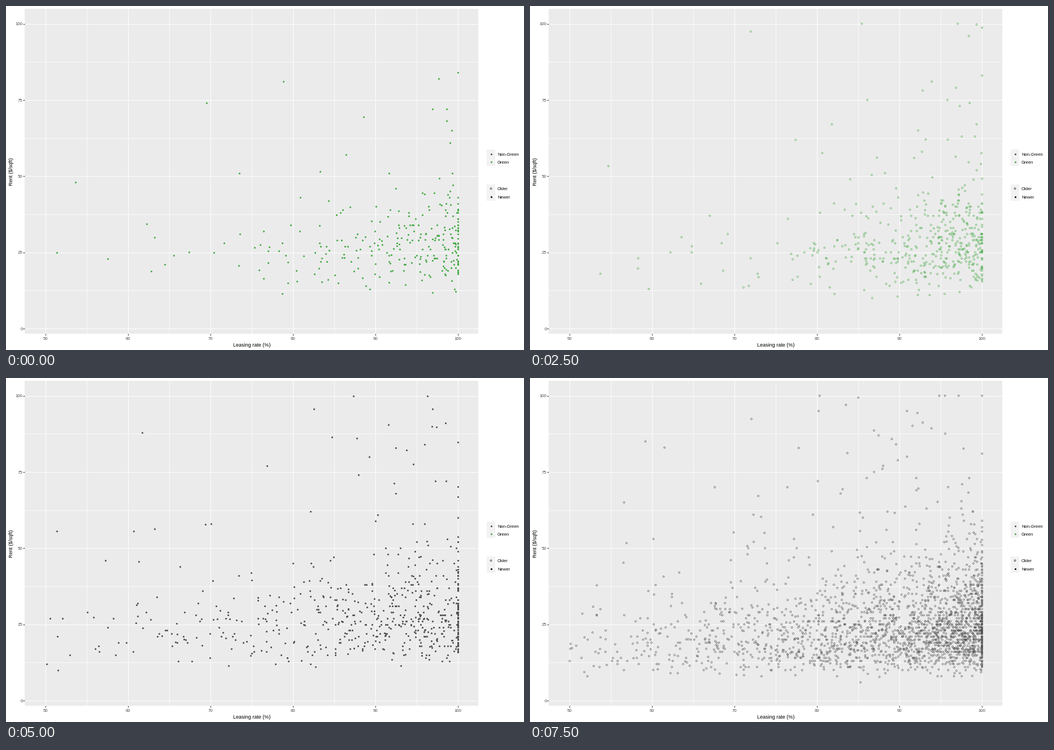
A matplotlib script for the animation above (10 s loop, 917x611 px).

```python
import matplotlib.pyplot as plt
import numpy as np
from matplotlib.animation import FuncAnimation
from matplotlib.patches import Rectangle

WIDTH, HEIGHT, DPI = 917, 611, 100
PT = 72 / DPI  # points per pixel
LEFT, RIGHT, TOP, BOTTOM = 32.5, 835.5, 4, 581
GREEN, GREY, LABEL = "#43a843", "#4d4d4d", "#4d4d4d"

plt.rcParams["font.family"] = "Liberation Sans"
rng = np.random.default_rng(11)


def rate_x(rate):
    return 69.5 + 14.605 * (rate - 50)


def rent_y(rent):
    return 572.5 - 5.415 * rent


def buildings(count, leased, spread, median, sigma, tail, landmarks):
    """Rates thin out exponentially below 100 %, rents are log-normal with a long tail."""
    total = count + leased
    vacancy = -spread * np.log(1 - rng.random(total) * (1 - np.exp(-50 / spread)))
    vacancy[count:] = 0
    rent = median * (1 - 0.006 * vacancy) * np.exp(sigma * rng.standard_normal(total))
    rent += (rng.random(total) < tail) * rng.exponential(22, total)
    rent = np.where(rng.random(total) < 0.5, np.round(rent), rent)
    cloud = np.column_stack([100 - vacancy, np.clip(rent, 3, 100)])
    return np.vstack([cloud, landmarks])


fig = plt.figure(figsize=(WIDTH / DPI, HEIGHT / DPI), dpi=DPI, facecolor="white")
ax = fig.add_axes([0, 0, 1, 1])
ax.set(xlim=(-0.5, WIDTH - 0.5), ylim=(HEIGHT - 0.5, -0.5))
ax.axis("off")


def box(x, y, w, h, color):
    ax.add_patch(Rectangle((x, y), w, h, fc=color, lw=0, zorder=0))


def line(xs, ys, color, width=1.0):
    ax.plot(xs, ys, color=color, lw=width * PT, solid_capstyle="butt", zorder=1)


def text(x, y, label, size, color="black", **kwargs):
    ax.text(x, y, label, fontsize=size * PT, color=color, va="baseline", **kwargs)


def dots(x, y, color, filled):
    size, edge = (2.7, 0.4) if filled else (2.9, 0.6)
    return ax.scatter(x, y, s=(size * PT) ** 2, facecolors=color if filled else "none",
                      edgecolors=color, linewidths=edge * PT, zorder=3)


box(LEFT, TOP, RIGHT - LEFT, BOTTOM - TOP, "#ebebeb")
for rate in range(50, 101, 5):
    x, major = rate_x(rate), rate % 10 == 0
    line([x, x], [TOP, BOTTOM], "white", 0.95 if major else 0.7)
    if major:
        line([x, x], [BOTTOM, BOTTOM + 3], "#333333")
        text(x, 592.5, str(rate), 7.8, LABEL, ha="center")
for rent in np.arange(0, 101, 12.5):
    y, major = rent_y(rent), rent % 25 == 0
    line([LEFT, RIGHT], [y, y], "white", 0.95 if major else 0.7)
    if major:
        line([LEFT - 3, LEFT], [y, y], "#333333")
        text(29, y + 2.8, f"{rent:.0f}", 7.8, LABEL, ha="right")
text(434.5, 604.7, "Leasing rate (%)", 9, ha="center")
text(11.7, 293.5, "Rent ($/sqft)", 9, ha="center", rotation=90, rotation_mode="anchor")

legend = [("Non-Green", GREY, True), ("Green", GREEN, True),
          ("Older", "black", False), ("Newer", "black", True)]
for row, (label, color, filled) in enumerate(legend):
    y = 262 + 14.5 * (row % 2) + 61.8 * (row // 2)
    box(850.7, y - 7.3, 14.5, 14.5, "#f2f2f2")
    dots([858], [y], color, filled)
    text(869.5, y + 3, label, 7.6)

layers = []
for color, filled, sample in [
    (GREEN, True, (242, 34, 10.5, 28, 0.30, 0.04,
                   [(69.5, 74), (78.8, 81), (73.5, 51), (86.4, 57), (96.9, 72),
                    (98.6, 72), (99.2, 65), (100, 84)])),
    (GREEN, False, (465, 38, 8.3, 27, 0.31, 0.06,
                    [(54.7, 53.3), (81.8, 67), (86.1, 75), (93.9, 81), (95.8, 75),
                     (97.3, 73), (98.4, 96), (100, 98.7)])),
    (GREY, True, (530, 95, 14.5, 28, 0.33, 0.07,
                  [(51.4, 55.5), (63.2, 56.3), (82.1, 62), (84.7, 86.4), (89.2, 80),
                   (96.8, 90), (97.4, 89.8), (98.5, 91)])),
    (GREY, False, (2080, 160, 14, 24, 0.38, 0.09,
                   [(59.2, 85), (67.6, 70), (72.3, 61), (80.1, 72), (83.5, 97),
                    (85, 99.4), (86.9, 88.6), (90.9, 95)])),
]:
    rates, rents = buildings(*sample).T
    layers.append(dots(rate_x(rates), rent_y(rents), color, filled))


def update(state):
    for index, layer in enumerate(layers):
        layer.set_visible(index == state)
    return layers


anim = FuncAnimation(fig, update, frames=len(layers), interval=2500,
                     repeat=True, repeat_delay=0, blit=False)
plt.show()
```
